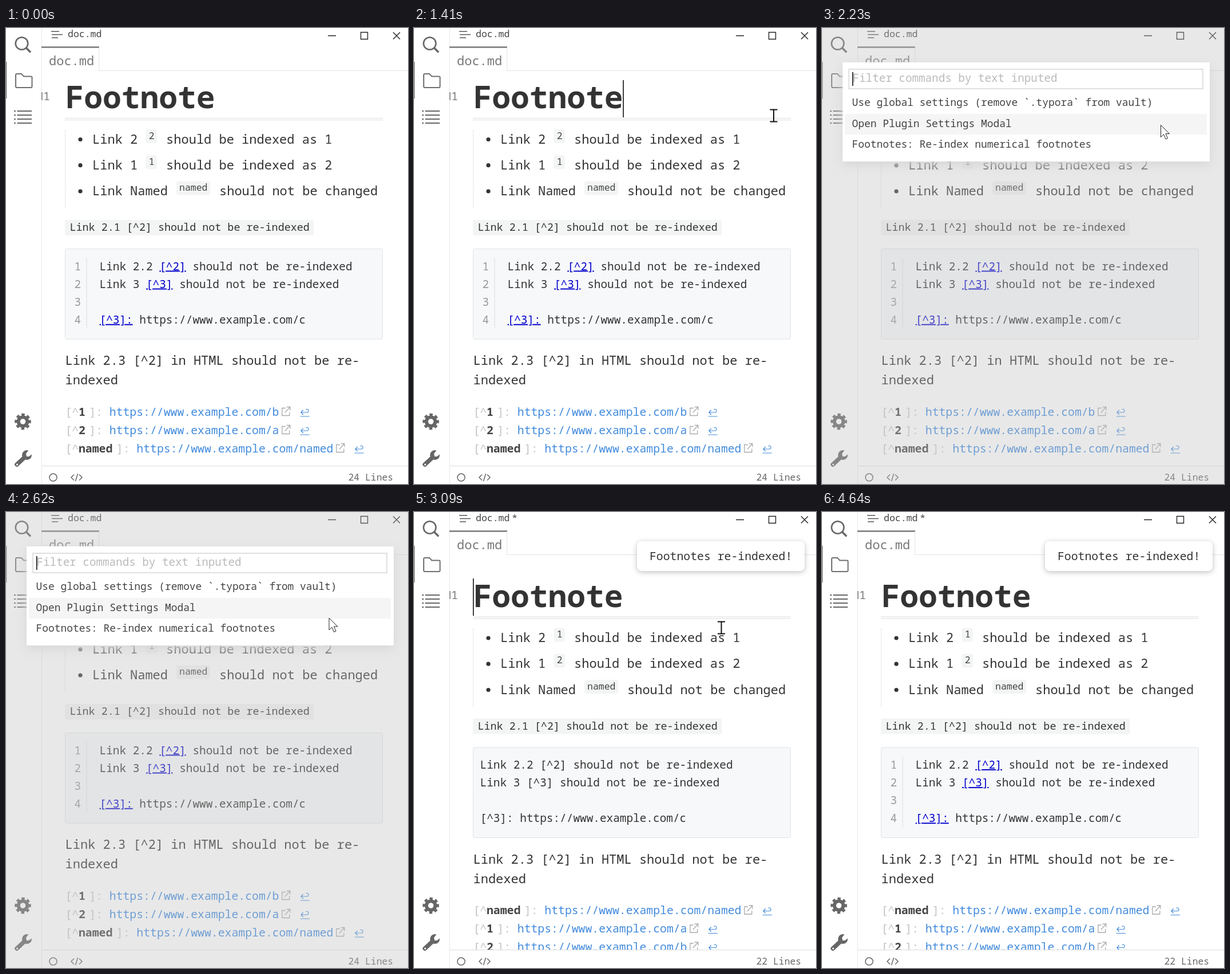
An HTML page for the animation above (5.31 s loop, 703 by 796 pixels).

```html
<!DOCTYPE html>
<html lang="en">
<head>
<meta charset="utf-8">
<title>Footnote re-index</title>
<style>
html, body { margin: 0; width: 100%; height: 100%; overflow: hidden; background: #fff; }
svg { display: block; width: 703px; height: 796px; }
text { font-family: "Noto Sans Mono", "DejaVu Sans Mono", monospace; white-space: pre; font-variant-ligatures: none; }
.line { fill: none; stroke: #666; }
#dialog .card { filter: drop-shadow(0 6px 9px #d6d6d6); }
#toast .card { filter: drop-shadow(0 2px 5px rgba(0, 0, 0, .25)); }
</style>
</head>
<body>
<svg id="stage" viewBox="0 0 703 796"></svg>
<script>
const LOOP = 5310, SHIFT = 25.5, LINK = '#428bdd';

const text = (x, y, size, str, fill = '#333', attrs = '') =>
  `<text x="${x}" y="${y}" font-size="${size}" fill="${fill}" ${attrs}>${str}</text>`;
const rect = (x, y, w, h, fill, attrs = '') =>
  `<rect x="${x}" y="${y}" width="${w}" height="${h}" fill="${fill}" ${attrs}/>`;
const line = (d, stroke = '#666', width = 1, attrs = '') =>
  `<path class="line" d="${d}" style="stroke:${stroke};stroke-width:${width}" ${attrs}/>`;
const group = (id, body, attrs = '') => `<g id="${id}" ${attrs}>${body}</g>`;

function listItem(y, label, mark, rest) {
  const x = 151 + label.length * 13.2 + (mark.length > 1 ? 15 : 14.5);
  const w = mark.length * 9.9 + 9.5;
  return `<circle cx="130" cy="${y - 7}" r="3.6" fill="#333"/>` +
    text(151, y, 22, label) +
    rect(x, y - 24.5, w, 24, '#f3f4f4', 'rx="4"') +
    text(x + 5, y - 8, 16.5, mark, '#444') +
    text(x + w + 16, y, 22, rest);
}

function footnote(y, name, page) {
  const bracket = 133.5 + name.length * 11.88;
  const url = 'https://www.example.com/' + page;
  const link = bracket + 35.4, end = link + url.length * 11.88;
  return text(103.5, y, 19.8, '[^', '#c4c4c4') +
    text(127, y, 19.8, name, '#444', 'font-weight="bold"') +
    text(bracket, y, 19.8, ']:', '#c4c4c4') +
    text(link, y, 19.8, url, LINK) +
    line(`M${end + 11} ${y - 13}h-6v13h13v-6M${end + 10} ${y - 5}l9-10m-6 0h6v6`, '#aaa', 1.3) +
    line(`M${end + 42} ${y - 9.5}l-4 4 4 4m-4-4h11.500a3 3 0 0 0 0-5.500h-3M${end + 37} ${y + 1.5}h16`, LINK, 1.2);
}

function codeBlock(numbered) {
  const rows = ['Link 2.2 [^2] should not be re-indexed', 'Link 3 [^3] should not be re-indexed', '', '[^3]: https://www.example.com/c'];
  const link = s => s.replace(/\[\^\d\]:?/, '<tspan fill="#00c" text-decoration="underline">$&</tspan>');
  return rect(103.5, 385.5, 555, 157.5, '#f7f8fa', 'rx="3" stroke="#dfe2e5"') +
    rows.map((row, i) => {
      const y = 422.5 + i * 31.1;
      return numbered
        ? text(119.5, y, 19.4, i + 1, '#999') + text(163.5, y, 19.4, link(row))
        : text(115.5, y, 19.4, row);
    }).join('') +
    (numbered ? line('M141 402V525', '#ddd') : '');
}

function page(id, marks, notes, numbered, dy) {
  return group(id,
    text(53, 126, 20, 'H1', '#777') +
    text(103.5, 140, 54.6, 'Footnote', '#333', 'font-weight="bold"') +
    line('M103 157.500H659M103 160.500H659', '#ddd') +
    line('M103.500 178V314', '#bbb', 1, 'stroke-dasharray="1 2"') +
    listItem(201.5, 'Link 2', marks[0], 'should be indexed as 1') +
    listItem(246.7, 'Link 1', marks[1], 'should be indexed as 2') +
    listItem(292, 'Link Named', 'named', 'should not be changed') +
    rect(103, 335, 435, 27, '#f3f4f4', 'rx="3"') +
    text(111.5, 354, 18.4, 'Link 2.1 [^2] should not be re-indexed') +
    codeBlock(numbered) +
    text(103.5, 588, 22, 'Link 2.3 [^2] in HTML should not be re-') +
    text(103.5, 622, 22, 'indexed') +
    notes.map(([name, path], i) => footnote(676.5 + i * 32, name, path)).join(''),
    `transform="translate(0 ${dy})"`);
}

const sidebar =
  line('M62.500 0V796', '#e8e8e8') + line('M.5 59V123', '#777', 1.5) +
  '<circle cx="27.500" cy="27" r="10.800" class="line" stroke-width="2.600"/>' +
  line('M35 34.500L43 42.500', '#666', 3.4) +
  line('M17 82a2 2 0 0 1 2-2h8l4 4.500h12.500a2 2 0 0 1 2 2V102a2 2 0 0 1-2 2H19a2 2 0 0 1-2-2z', '#707070', 2) +
  [145, 152, 159, 166].map(y => line(`M14 ${y}h3m2.500 0H45`, '#666', 2.2)).join('') +
  '<circle cx="29.500" cy="687" r="7.800" class="line" stroke-width="6"/>' +
  '<circle cx="29.500" cy="687" r="12" class="line" stroke-width="4.600" stroke-dasharray="5.200 4.225" transform="rotate(-12 29.500 687)"/>' +
  line('M19 762L34 748', '#666', 7.5, 'stroke-linecap="round"') +
  '<circle cx="36.500" cy="745.500" r="8.500" fill="#666"/>' +
  '<path d="M35 743l6-8 7 7-8 6h-4z" fill="#fff"/><circle cx="19.500" cy="762" r="1.500" fill="#fff"/>';

const frame =
  line('M79 6h14M80 11.500h19M80 17h11', '#555', 1.6) +
  text(108, 16, 16.5, 'doc.md', '#444') +
  group('dirty', text(171, 17, 16.5, '*', '#444')) +
  line('M563 13.500h14M620.500 7.500h12v12h-12zM677 7.500l12 12m0-12l-12 12', '#222', 1.4) +
  line('M62 33.500H163', '#777', 2.6) + line('M162.500 34V74.500H703', '#e4e4e4') +
  text(75, 65, 22, 'doc.md', '#777') +
  line('M62 764.500H703', '#ddd') +
  '<circle cx="82.500" cy="784.500" r="6.500" class="line" stroke-width="1.500"/>' +
  line('M119 779.500l-5 5 5 5M128 779.500l5 5-5 5M125.500 778l-4 13', '#666', 1.5) +
  text(598.5, 790, 16.4, '', '#666', 'id="count"');

const dialog =
  rect(0, 0, 703, 796, '#c0c0c0', 'opacity=".36"') +
  rect(36, 60, 642, 173, '#fff', 'class="card"') +
  rect(47, 72, 619, 34, '#fff', 'stroke="#ddd" stroke-width="1.800"') +
  text(53.5, 94, 19.25, 'Filter commands by text inputed', '#bbb') +
  rect(40, 150, 633, 36, '#f5f5f5', 'id="hover"') +
  ['Use global settings (remove `.typora` from vault)', 'Open Plugin Settings Modal', 'Footnotes: Re-index numerical footnotes']
    .map((s, i) => text(52.5, 136 + i * 36.6, 17.9, s, '#444')).join('') +
  rect(53, 77, 1.5, 24, '#000', 'id="inputCaret"');

const stage = document.getElementById('stage');
stage.innerHTML =
  '<clipPath id="view"><path d="M62 75H703V764H62z"/></clipPath>' +
  rect(0, 0, 703, 796, '#fff') + sidebar +
  group('editor',
    page('before', ['2', '1'], [['1', 'b'], ['2', 'a'], ['named', 'named']], true, 0) +
    ['plain', 'after'].map(id =>
      page(id, ['1', '2'], [['named', 'named'], ['1', 'a'], ['2', 'b']], id === 'after', SHIFT)).join('') +
    rect(0, 0, 1.5, 65, '#000', 'id="caret"'), 'clip-path="url(#view)"') +
  frame +
  group('dialog', dialog) +
  group('toast', rect(390, 51, 293, 52, '#fff', 'rx="8" class="card"') + text(412, 83.5, 19.8, 'Footnotes re-indexed!')) +
  group('arrow', '<path d="M.5 .5V21.500l5-4.800 3.600 8.300 3.400-1.500-3.500-8h6.500z" fill="#fff" stroke="#222"/>') +
  group('beam', line('M-6.500-10.500H6.500M0-10.500V10.500M-6.500 10.500H6.500', '#111', 2));

const $ = id => document.getElementById(id);
const show = (id, on) => $(id).setAttribute('visibility', on ? 'visible' : 'hidden');
const place = (id, x, y) => $(id).setAttribute('transform', `translate(${x} ${y})`);

function glide(t, start, step, [x0, y0], [x1, y1]) {
  const p = Math.min(6, Math.max(0, Math.floor((t - start) / step) + 1)) / 6;
  const e = p * p * (3 - 2 * p);
  return [x0 + (x1 - x0) * e, y0 + (y1 - y0) * e];
}

function arrowAt(t) {
  if (t < 2110) return glide(t, 590, 70, [666, 286], [628, 142]);
  if (t < 2230) return [628, 152];
  if (t < 3090) return glide(t, 2370, 90, [592, 169], [537, 200]);
  return [572, 178];
}

function render(t) {
  const within = (a, b) => t >= a && t < b;
  const done = t >= 3090;
  show('before', !done);
  show('plain', within(3090, 3570));
  show('after', t >= 3570);
  show('dirty', done);
  show('toast', done);
  $('count').textContent = (done ? 22 : 24) + ' Lines';

  show('caret', within(1370, 1900) || within(3090, 3570) || within(4110, 4640));
  place('caret', done ? 103 : 365.3, done ? 116 : 91);

  const pos = arrowAt(t);
  show('dialog', within(2230, 3090));
  show('inputCaret', within(2230, 2730));
  $('hover').setAttribute('y', pos[1] > 185 ? 186 : 150);

  show('arrow', within(660, 1370) || within(2110, 2950) || within(3840, 3910));
  place('arrow', ...pos);
  show('beam', within(1370, 2110) || within(2950, 3840));
  place('beam', t < 2110 ? 629 : 537.5, t < 2110 ? 153 : 202);
}

(function tick() {
  render(performance.now() % LOOP);
  requestAnimationFrame(tick);
})();
</script>
</body>
</html>
```
